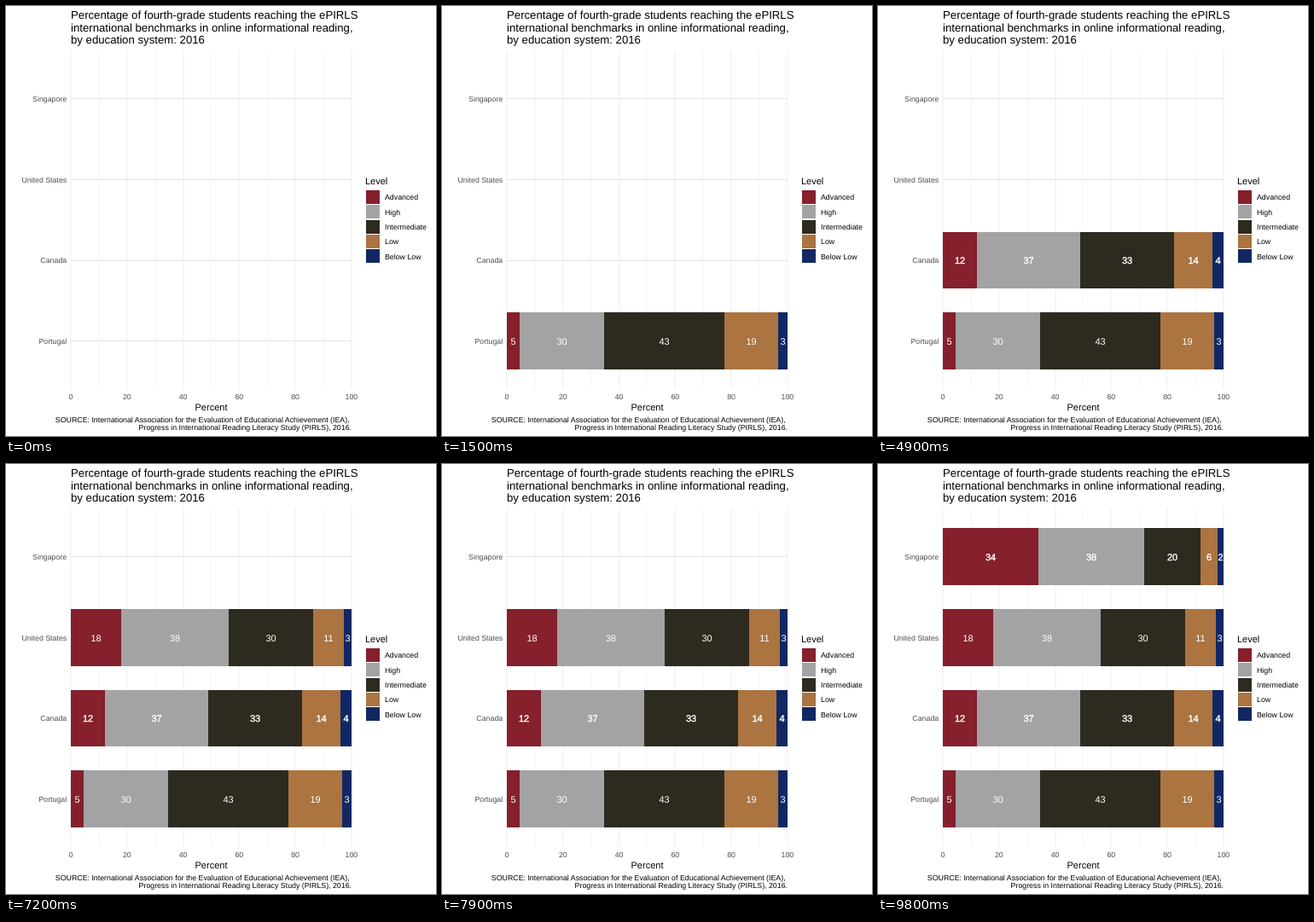
These frames come from a looping animation (504x504 px, 10000 ms). An HTML page:

```html
<!DOCTYPE html>
<html lang="en">
<head>
<meta charset="utf-8">
<title>Reading benchmarks by education system</title>
<style>
  html, body { margin: 0; width: 100%; height: 100%; overflow: hidden; background: #fff; }
  svg { display: block; width: 504px; height: 504px; }
  text {
    font-family: "Liberation Sans", Arial, Helvetica, sans-serif;
    font-size: 8.8px;
    text-rendering: geometricPrecision;
    white-space: pre;
  }
  .title { font-size: 13.2px; }
  .head { font-size: 11px; }
  .axis { fill: #4d4d4d; }
  .value { font-size: 11px; fill: #fff; stroke: #fff; stroke-width: 0; }
</style>
</head>
<body>
<svg id="chart" viewBox="0 0 504 504"></svg>
<script>
const LOOP = 10000;
const LEFT = 76, UNIT = 3.289, TOP = 52, BOTTOM = 449, BAR = 66.5;

const levels = [
  ["Advanced", "#85202c"], ["High", "#a3a3a3"], ["Intermediate", "#2d2a20"],
  ["Low", "#ab7441"], ["Below Low", "#112864"]
];

// edges: inner boundaries in pixels; show / firm: times in ms
const rows = [
  { name: "Singapore", y: 108.6, edges: [188, 312, 378, 398], values: [34, 38, 20, 6, 2], show: 9300, firm: 9600 },
  { name: "United States", y: 203.3, edges: [135, 261, 360, 396], values: [18, 38, 30, 11, 3], show: 7200 },
  { name: "Canada", y: 298, edges: [116, 237, 347, 392], values: [12, 37, 33, 14, 4], show: 4400, firm: 4600 },
  { name: "Portugal", y: 392.6, edges: [91, 190, 331, 394], values: [5, 30, 43, 19, 3], show: 700 }
];

const chart = document.getElementById("chart");

function add(parent, tag, attrs) {
  const el = document.createElementNS("http://www.w3.org/2000/svg", tag);
  for (const key in attrs) el.setAttribute(key, attrs[key]);
  parent.appendChild(el);
  return el;
}
function label(parent, x, y, str, cls = "", anchor = "start") {
  add(parent, "text", { x, y, class: cls, "text-anchor": anchor }).textContent = str;
}
function rect(parent, x, y, width, height, fill) {
  add(parent, "rect", { x, y, width, height, fill });
}

function drawFrame() {
  ["Percentage of fourth-grade students reaching the ePIRLS",
   "international benchmarks in online informational reading,",
   "by education system: 2016"
  ].forEach((line, i) => label(chart, 76, 15 + i * 14.6, line, "title"));

  for (let p = 0; p <= 100; p += 10) {
    const major = p % 20 === 0;
    rect(chart, Math.round(LEFT + p * UNIT) - 0.5, TOP, 1, BOTTOM - TOP, major ? "#ededed" : "#f5f5f5");
    if (major) label(chart, LEFT + p * UNIT, 461, p, "axis", "middle");
  }
  for (const row of rows) {
    rect(chart, LEFT, Math.floor(row.y), 329, 1, "#e4e4e4");
    label(chart, 71.2, row.y + 3.4, row.name, "axis", "end");
  }

  label(chart, 240.5, 474, "Percent", "head", "middle");
  label(chart, 402.6, 488, "SOURCE: International Association for the Evaluation of Educational Achievement (IEA),", "", "end");
  label(chart, 405, 497.3, "Progress in International Reading Literacy Study (PIRLS), 2016.", "", "end");

  label(chart, 421, 209, "Level", "head");
  levels.forEach(([name, color], i) => {
    const y = 224 + i * 17.35;
    rect(chart, 422, Math.round(y - 8), 16, 16, color);
    label(chart, 444, y + 3.2, name);
  });
}

function drawBars(row) {
  row.group = add(chart, "g", { visibility: "hidden" });
  const xs = [LEFT, ...row.edges, 405];
  const top = Math.round(row.y - BAR / 2);
  levels.forEach(([, color], i) =>
    rect(row.group, xs[i], top, xs[i + 1] - xs[i], Math.round(row.y + BAR / 2) - top, color));
  row.values.forEach((v, i) =>
    label(row.group, (xs[i] + xs[i + 1]) / 2, row.y + 4.3, v, "value", "middle"));
}

function render(t) {
  for (const row of rows) {
    row.group.setAttribute("visibility", t >= row.show ? "visible" : "hidden");
    const weight = row.firm && t >= row.firm ? 0.4 : 0;
    for (const el of row.group.querySelectorAll("text")) el.style.strokeWidth = weight;
  }
}

drawFrame();
rows.forEach(drawBars);
const start = performance.now();
function tick() {
  render((performance.now() - start) % LOOP);
  requestAnimationFrame(tick);
}
tick();
</script>
</body>
</html>
```
